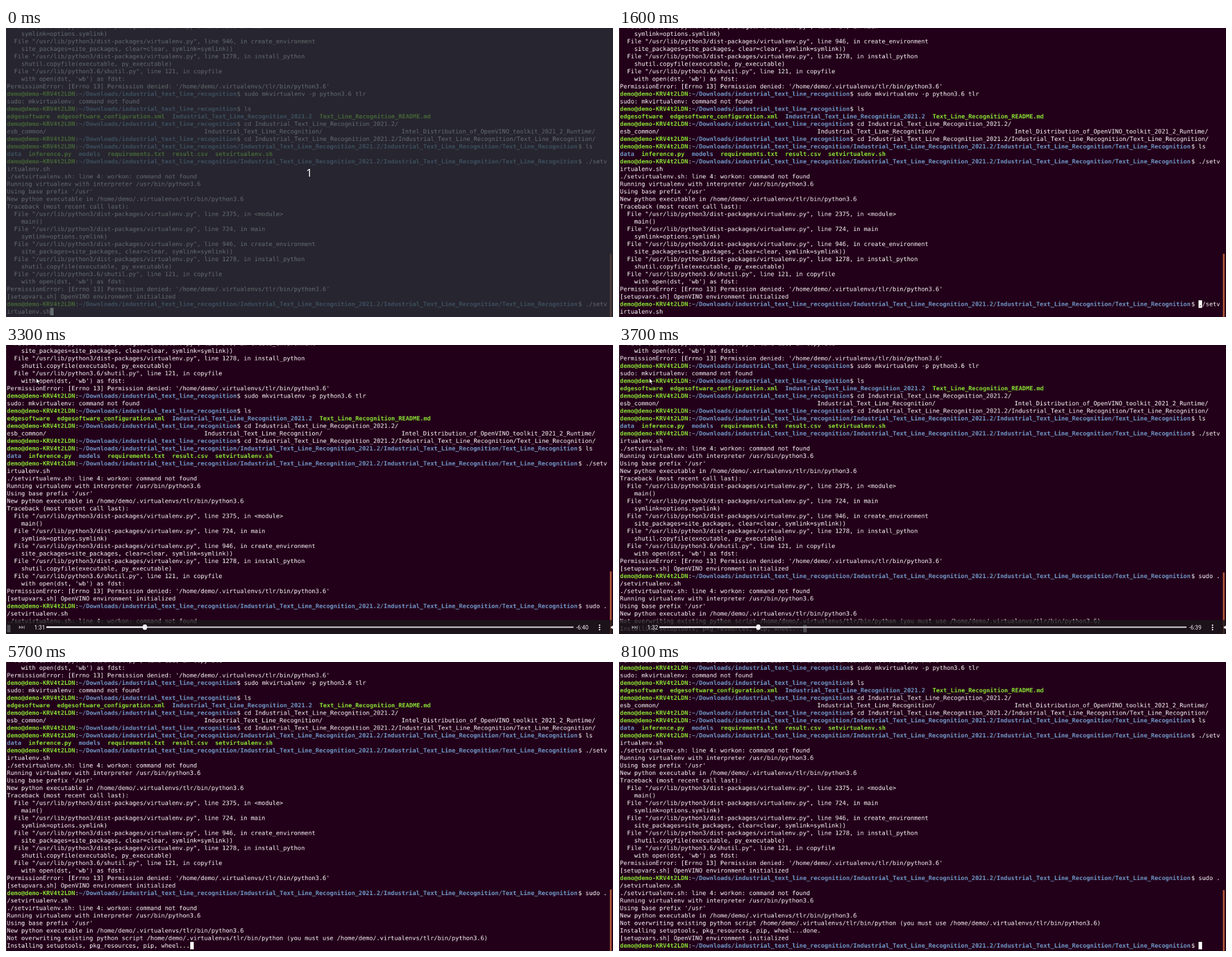
Animation of 1084 by 517 pixels, one loop 8600 ms. Source, as an HTML page with a canvas:

```html
<!DOCTYPE html>
<html lang="en">
<head>
<meta charset="utf-8">
<title>Terminal session</title>
<style>
  html, body { margin: 0; width: 100%; height: 100%; overflow: hidden; background: #230019; }
  canvas { display: block; }
</style>
</head>
<body>
<canvas id="stage" width="1084" height="517"></canvas>
<script>
const ctx = document.getElementById('stage').getContext('2d');
const W = 1084, H = 517, LOOP = 8600;

// The terminal is drawn on its own pixel grid, then shown scaled down like a screen recording.
const COLS = 167, ROWS = 40, CELL_W = 8, CELL_H = 17, BASE = 13;
const LEFT = 1.6, BOTTOM = 514.03, SCALE_X = 0.8022, SCALE_Y = 0.79;
const MONO = '13.288px "DejaVu Sans Mono", monospace';
const screen = document.createElement('canvas');
screen.width = COLS * CELL_W;
screen.height = ROWS * CELL_H;
const term = screen.getContext('2d');
term.textRendering = 'geometricPrecision';
term.fontKerning = 'none';

const BG = '#230019';
const COLORS = { w: '#ffffff', g: '#8ae234', b: '#7099c8' };

// ^w, ^g and ^b switch to white, bold green and bold blue.
const HOST = '^gdemo@demo-KRV4t2LDN^w:^b';
const HOME = '~/Downloads/industrial_text_line_recognition';
const ITLR = 'Industrial_Text_Line_Recognition';
const PKG = ITLR + '_2021.2';
const SHORT = HOST + HOME + '^w$ ';
const LONG = `${HOST}${HOME}/${PKG}/${ITLR}/Text_Line_Recognition^w$ `;
const PROMPT_COLS = LONG.replace(/\^./g, '').length;
const SCRIPT = './setvirtualenv.sh';
const VENV = '/home/demo/.virtualenvs/tlr/bin/python';
const READY = '[setupvars.sh] OpenVINO environment initialized';

const START = [
  SCRIPT + ': line 4: workon: command not found',
  'Running virtualenv with interpreter /usr/bin/python3.6',
  "Using base prefix '/usr'",
  `New python executable in ${VENV}3.6`
];
const file = (path, line, fn) => `  File "/usr/lib/${path}.py", line ${line}, in ${fn}`;
const venvFile = (line, fn) => file('python3/dist-packages/virtualenv', line, fn);
const TRACE = [
  venvFile(724, 'main'),
  '    symlink=options.symlink)',
  venvFile(946, 'create_environment'),
  '    site_packages=site_packages, clear=clear, symlink=symlink))',
  venvFile(1278, 'install_python'),
  '    shutil.copyfile(executable, py_executable)',
  file('python3.6/shutil', 121, 'copyfile'),
  "    with open(dst, 'wb') as fdst:",
  `PermissionError: [Errno 13] Permission denied: '${VENV}3.6'`
];
const HISTORY = [
  ...TRACE,
  SHORT + 'sudo mkvirtualenv -p python3.6 tlr',
  'sudo: mkvirtualenv: command not found',
  SHORT + 'ls',
  `^gedgesoftware  edgesoftware_configuration.xml  ^b${PKG}  ^gText_Line_Recognition_README.md`,
  `${SHORT}cd ${PKG}/`,
  'esb_common/'.padEnd(55) + (ITLR + '/').padEnd(55) + 'Intel_Distribution_of_OpenVINO_toolkit_2021_2_Runtime/',
  `${SHORT}cd ${PKG}/${ITLR}/Text_Line_Recognition/`,
  LONG + 'ls',
  '^bdata  ^ginference.py  ^bmodels  ^grequirements.txt  result.csv  setvirtualenv.sh',
  LONG + SCRIPT,
  ...START,
  'Traceback (most recent call last):',
  venvFile(2375, '<module>'),
  '    main()',
  ...TRACE,
  READY
];
const OUTPUT = [
  ...START,
  `Not overwriting existing python script ${VENV} (you must use ${VENV}3.6)`,
  'Installing setuptools, pkg_resources, pip, wheel...'
];

const clamp = v => Math.min(1, Math.max(0, v));

// Value of the latest step that has begun.
function stepAt(t, steps) {
  let value = steps[0][1];
  for (const [start, v] of steps) if (t >= start) value = v;
  return value;
}

function layout(line) {
  const rows = [[]];
  let col = 0;
  line.split('^').forEach((part, i) => {
    const style = i ? part[0] : 'w';
    let text = i ? part.slice(1) : part;
    while (text) {
      if (col === COLS) { rows.push([]); col = 0; }
      const piece = text.slice(0, COLS - col);
      rows[rows.length - 1].push({ style, col, text: piece });
      col += piece.length;
      text = text.slice(piece.length);
    }
  });
  return rows;
}

const historyRows = HISTORY.flatMap(layout);

function outputAt(t) {
  if (t < 3300) return [];
  const lines = OUTPUT.slice(0, stepAt(t, [[3300, 1], [3400, 2], [3600, 5], [3700, 6]]));
  if (t >= 6500) lines[5] += 'done.';
  if (t >= 6900) lines.push(READY, LONG);
  else if (t < 3700 || t >= 6500) lines.push('');
  return lines;
}

function cursorOn(t) {
  if (t < 3900) return t < 1800 || t >= 2200;
  return Math.floor((t - 3900) / 600) % 2 === 1;
}

function drawTerminal(t) {
  const typed = 'sudo '.slice(0, stepAt(t, [[0, 0], [2200, 2], [2400, 3], [2500, 4], [2700, 5]]));
  const command = typed + SCRIPT;
  const output = outputAt(t);
  const rows = [...historyRows, ...layout(LONG + command), ...output.flatMap(layout)];
  const rowTop = i => (ROWS - rows.length + i) * CELL_H;
  const put = (text, col, row) => term.fillText(text, col * CELL_W, rowTop(row) + BASE);

  term.fillStyle = BG;
  term.fillRect(0, 0, screen.width, screen.height);
  rows.forEach((row, i) => {
    for (const { style, col, text } of row) {
      term.font = (style === 'w' ? '' : 'bold ') + MONO;
      term.fillStyle = COLORS[style];
      put(text, col, i);
    }
  });

  if (cursorOn(t)) {
    let row = rows.length - 1, col = 0, under = '';
    if (output.length) {
      const last = rows[row][rows[row].length - 1];
      if (last) col = last.col + last.text.length;
    } else {
      const pos = typed.length + stepAt(t, [[0, 18], [200, 17], [400, 11], [600, 4], [800, 0]]);
      row = historyRows.length + Math.floor((PROMPT_COLS + pos) / COLS);
      col = (PROMPT_COLS + pos) % COLS;
      under = command[pos] || '';
    }
    term.fillStyle = COLORS.w;
    term.fillRect(col * CELL_W, rowTop(row), CELL_W, CELL_H);
    term.fillStyle = BG;
    term.font = MONO;
    put(under, col, row);
  }

  const height = screen.height * SCALE_Y;
  ctx.fillStyle = BG;
  ctx.fillRect(0, 0, W, H);
  ctx.drawImage(screen, LEFT, BOTTOM - height, screen.width * SCALE_X, height);

  const scrolled = rows.length - historyRows.length - 2;
  ctx.fillStyle = '#43303a';
  ctx.fillRect(0, 0, 1, H);
  ctx.fillStyle = '#b95c3b';
  ctx.fillRect(1078.5, 404 + scrolled / 2, 3, H);
}

function shape(points) {
  ctx.beginPath();
  points.forEach(([x, y]) => ctx.lineTo(x, y));
  ctx.closePath();
}

function dot(x, y, r) {
  ctx.beginPath();
  ctx.arc(x, y, r, 0, 7);
  ctx.fill();
}

const clock = s => Math.floor(s / 60) + ':' + String(s % 60).padStart(2, '0');

function drawControls(t) {
  const alpha = Math.min(clamp((t - 2300) / 200), clamp((5500 - t) / 300));
  if (!alpha) return;
  const media = 90.9 + (t - 2400) / 1000, total = 491;
  const from = 72, to = 1013.5, mid = 504.8;
  const knob = from + (to - from) * media / total;

  ctx.save();
  ctx.globalAlpha = alpha;
  ctx.fillStyle = 'rgba(26,24,26,.78)';
  ctx.fillRect(0, 492, W, H - 492);

  ctx.fillStyle = '#8b888b';
  for (const x of [23, 27.5]) {
    shape([[x, 502], [x + 4.5, 505], [x, 508]]);
    ctx.fill();
  }
  ctx.fillRect(32, 502, 1.2, 6);

  ctx.fillStyle = '#c4c2c4';
  ctx.fillRect(from, mid - 1.3, to - from, 2.6);
  ctx.fillStyle = '#f4f4f4';
  ctx.fillRect(from, mid - 1.3, knob - from, 2.6);
  ctx.beginPath();
  ctx.roundRect(knob - 3.7, mid - 4.7, 7.4, 9.4, 3);
  ctx.fill();

  const seconds = Math.floor(media);
  ctx.font = '10px Roboto, sans-serif';
  ctx.fillText(clock(seconds), 50.5, 508.5);
  ctx.fillText('-' + clock(total - seconds), 1018, 508.5);
  for (const dy of [-4, 0, 4]) dot(1060, 505.3 + dy, 1.3);
  shape([[1080, 503.5], [1082, 503.5], [1085, 500.5], [1085, 509.5], [1082, 506.8], [1080, 506.8]]);
  ctx.fill();
  ctx.restore();
}

function drawPointer(t) {
  if (t < 2500 || t >= 5100) return;
  const [x, y] = stepAt(t, [[2500, [54, 62]], [3300, [54, 59]], [4500, [56, 60]], [4900, [56, 22]]]);
  ctx.save();
  ctx.translate(x, y);
  shape([[0, 0], [0, 10], [2.3, 8], [4, 11.6], [5.6, 10.8], [4, 7.4], [7, 7.2]]);
  ctx.fillStyle = '#f2f2f2';
  ctx.strokeStyle = '#141014';
  ctx.lineWidth = 1;
  ctx.fill();
  ctx.stroke();
  ctx.restore();
}

function drawCountdown() {
  ctx.fillStyle = 'rgba(41,52,56,.72)';
  ctx.fillRect(0, 0, W, H);
  ctx.fillStyle = '#f4f4f4';
  ctx.font = '20px "Noto Sans", sans-serif';
  ctx.textAlign = 'center';
  ctx.fillText('1', 541.5, 265.5);
  ctx.textAlign = 'left';
}

function frame() {
  const t = Math.floor(performance.now() % LOOP / 100) * 100;
  drawTerminal(t);
  drawControls(t);
  drawPointer(t);
  if (t < 100) drawCountdown();
  requestAnimationFrame(frame);
}

frame();
</script>
</body>
</html>
```
